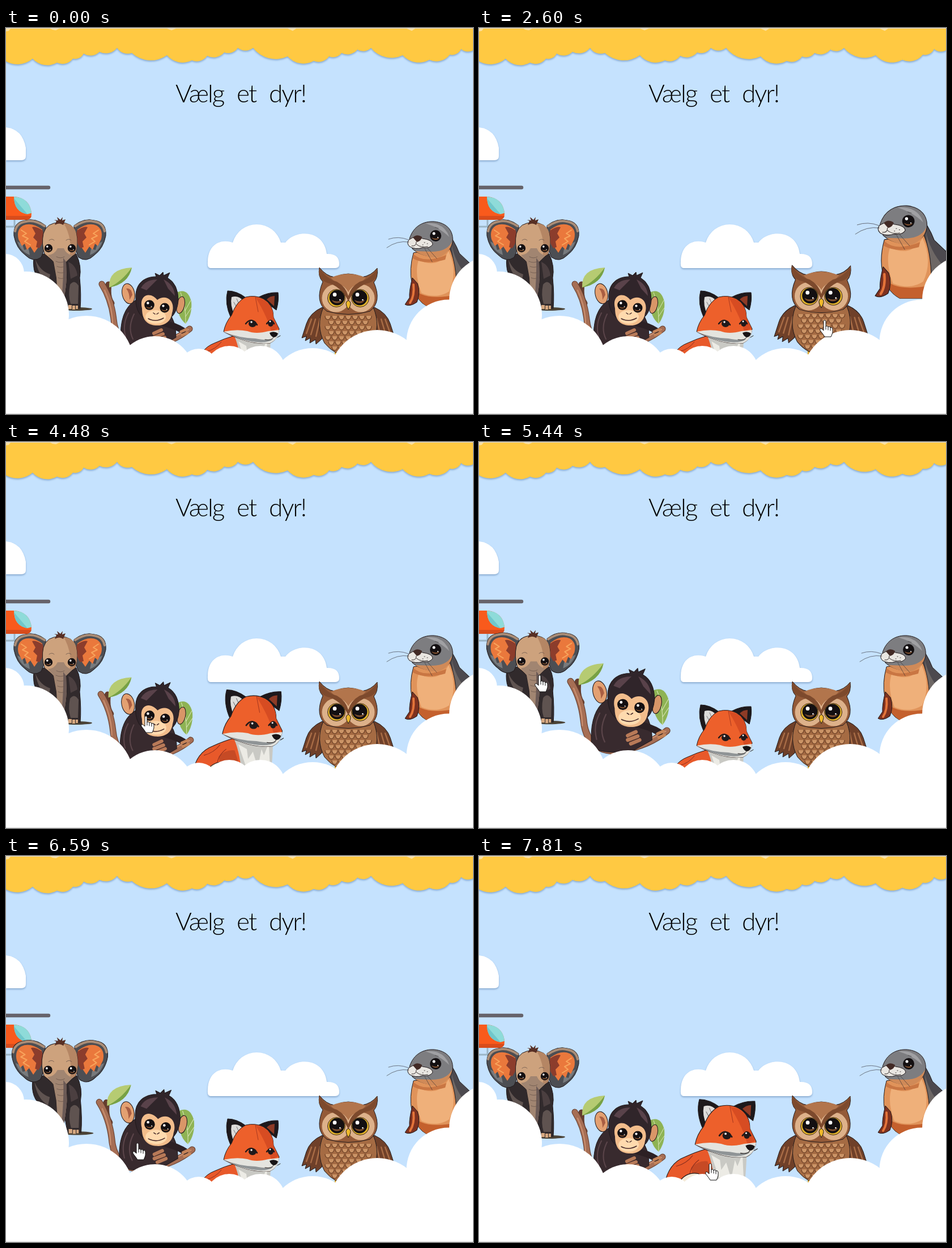
Recreate the animation shown at these times as an HTML page. Size 824x680 px, loop 8 s.

```html
<!DOCTYPE html>
<html lang="da">
<head>
<meta charset="utf-8">
<title>Vælg et dyr!</title>
<style>
html, body { margin: 0; width: 100%; height: 100%; overflow: hidden; background: #c5e2fe; }
svg { display: block; width: 824px; height: 680px; }
.shadow { filter: drop-shadow(0 2px 1.5px rgba(50, 90, 140, .4)); }
.line { fill: none; stroke-linecap: round; stroke-linejoin: round; }
.ink { stroke: #211a1c; stroke-width: 1; stroke-linejoin: round; }
text { font: 300 44px Lato, "Open Sans", sans-serif; letter-spacing: -2px; word-spacing: 13px; text-anchor: middle; }
</style>
</head>
<body>
<svg viewBox="0 0 824 680">
<defs>
  <g id="eye">
    <circle r="10" fill="#130f11"/>
    <path d="M-7 3A8 8 0 0 0 7 3Q0 7 -7 3Z" fill="#80502f"/>
    <circle cx="-3" cy="-4" r="2.5" fill="#fff"/><circle cx="4" cy="3" r="1" fill="#fff"/>
  </g>
</defs>
<rect width="824" height="680" fill="#c5e2fe"/>

<path id="awning" class="shadow" fill="#ffc942"/>
<path d="M0 1H8L5 5 0 6ZM78 1H94L88 4 82 3ZM284 1H300L292 4ZM497 1H512L506 5ZM707 1H722L716 5Z" fill="#fbe0a0"/>
<path d="M0 .5H824" stroke="#dcdcdc"/>
<text x="414" y="131">Vælg et dyr!</text>

<g fill="#fff" class="shadow">
  <path d="M0 175Q29 178 35 211V226Q35 233 27 233H0Z"/>
  <path d="M361 423Q355 423 356 412C356 384 376 370 400 378A44.2 44.2 0 0 1 485 378L493 378C511 354 561 355 566 398Q588 397 588 416 588 423 581 423Z"/>
</g>
<g id="helicopter">
  <path class="line" d="M0 281H75" stroke="#66636b" stroke-width="6.5"/>
  <path class="line" d="M15 337V350M0 350H26" stroke="#9bb5c6" stroke-width="3"/>
  <path d="M0 297H15Q42 300 45 326 45 338 36 338H0Z" fill="#f95a1c"/>
  <path d="M0 331H45Q43 338 36 338H0Z" fill="#d84c1c"/>
  <path d="M14 297Q42 299 45 326L38 328Q14 324 14 297Z" fill="#8edbd9"/>
  <path d="M14 300L38 328Q14 324 14 297Z" fill="#70c7cb"/>
</g>

<g id="elephant">
  <ellipse cx="124" cy="495" rx="28" ry="3" fill="#4b4336"/>
  <path class="ink" d="M50 398Q44 430 60 445L66 510H98L101 455 108 494H131Q133 470 130 440 134 420 124 398Z" fill="#312a2c"/>
  <path d="M52 408Q60 428 78 434L75 448Q56 436 52 408ZM113 452Q121 442 128 454L127 486H114Q109 470 113 452Z" fill="#5f5350"/>
  <path d="M110 412Q124 418 126 436L114 442Z" fill="#4b3f40"/>
  <path d="M110 488h6v7h-6zM117 489h5v7h-5zM123 489h4v6h-4z" fill="#d6a880"/>
  <g id="ear">
    <path class="ink" d="M70 348Q52 334 34 339 12 342 14 366 18 388 34 400 48 414 62 404 71 388 70 348Z" fill="#4c4e53"/>
    <path d="M20 376Q26 394 42 400L40 389 32 391 29 381Z" fill="#777a7d"/>
    <path d="M64 355Q45 341 30 348 18 355 22 372L28 384 33 380 37 391 43 385 50 396 57 386Q66 372 64 355Z" fill="#ea783c"/>
    <path d="M65 357Q52 348 46 351L52 362 48 369 55 376 53 386 59 388Q69 374 65 357Z" fill="#8c3d2c"/>
    <path d="M27 356l9 6-7 4 10 5-6 5 10 6" class="line" stroke="#f8a45c" stroke-width="2"/>
    <path class="line" d="M68 349Q50 337 35 341 19 343 16 358" stroke="#ab8d76" stroke-width="4"/>
  </g>
  <use href="#ear" transform="matrix(-1 0 0 1 190 0)"/>
  <path class="ink" d="M66 362Q72 342 95 343 118 342 124 362 128 380 122 398 114 404 106 412L107 440Q104 480 97 490 90 470 89 440L84 412Q76 404 68 398 62 380 66 362Z" fill="#cda27d"/>
  <path d="M102 344Q120 345 124 362 128 380 122 398L112 404Q118 372 102 344Z" fill="#b58664"/>
  <path d="M74 400Q86 399 91 388H102Q106 398 117 401L106 412 107 440Q104 480 97 490 90 470 89 440L84 412Z" fill="#a18571"/>
  <path d="M101 405L106 412 107 440Q104 480 97 490Q102 440 101 405Z" fill="#6b5a56"/>
  <path class="line" d="M89 403q7 4 14 0M88 411q8 4 16 0M90 420q7 3 14 0M91 430q7 3 13 0M92 440q6 3 12 0M76 374q5-4 9 0M106 374q5-4 9 0" stroke="#6b574d" stroke-width=".8"/>
  <use href="#eye" transform="translate(75 388) scale(.72)"/>
  <use href="#eye" transform="translate(116 388) scale(.72)"/>
  <path d="M86 347L89 340 85 338 92 339 90 333 96 338 100 333 99 339 105 337 101 347Q94 342 86 347Z" fill="#572f24"/>
</g>

<g id="monkey">
  <path class="line" d="M169 451Q186 478 190 513 194 560 238 563 290 558 324 530M186 485Q178 474 181 452" stroke="#643d2e" stroke-width="11"/>
  <path class="line" d="M169 451Q186 478 190 513 194 560 238 563 290 558 324 530" stroke="#a66e54" stroke-width="9"/>
  <path class="line" d="M174 462Q188 492 188 522M292 546L322 531" stroke="#c98f70" stroke-width="2"/>
  <path d="M182 457Q180 424 222 422 216 451 182 457Z" fill="#b6cb72"/>
  <path d="M182 457Q204 447 222 422 216 451 182 457Z" fill="#77a145"/>
  <path d="M303 465Q321 458 327 482 329 505 317 521 297 505 303 465Z" fill="#8eb354"/>
  <path class="line" d="M308 466Q318 490 317 521M326 480L316 498M327 493L317 508" stroke="#d8e5b4"/>
  <path class="ink" d="M231 478Q198 496 203 555 220 570 270 562L300 545Q300 515 286 500Z" fill="#382a2e"/>
  <path class="line" d="M216 502Q205 522 211 544M226 504Q214 528 224 548" stroke="#5b454a" stroke-width="2"/>
  <path class="line" d="M274 519Q298 524 312 533" stroke="#2c2024" stroke-width="11"/>
  <path class="line" d="M309 535l9-4M311 541l9-4" stroke="#c48358" stroke-width="5"/>
  <path class="line" d="M261 538l13-6M261 545l16-6M266 551l14-6" stroke="#b87a58" stroke-width="6"/>
  <path class="line" d="M262 541l14-6M264 548l15-6" stroke="#51312a"/>
  <ellipse class="ink" cx="216" cy="468" rx="11" ry="18" fill="#e3a071" transform="rotate(-12 216 468)"/>
  <path d="M212 459Q221 457 223 470L218 479Q218 466 212 459Z" fill="#a95e43"/>
  <ellipse class="ink" cx="308" cy="488" rx="7" ry="15" fill="#d99668" transform="rotate(12 308 488)"/>
  <path class="ink" d="M229 475C228 449 245 438 265 438L263 432 271 436 277 430 278 436 289 431 285 440Q304 451 304 480C302 503 290 519 266 519 242 517 228 502 229 475Z" fill="#30252a"/>
  <path d="M238 458Q246 443 267 443L248 462ZM278 443Q297 452 298 472L286 459Z" fill="#59424a"/>
  <path d="M240 494C234 470 254 463 267 479 282 468 300 480 293 502 291 519 278 525 264 524 247 523 240 512 240 494Z" fill="#f2bd8c"/>
  <ellipse cx="264" cy="509" rx="18" ry="12" fill="#ffdaae"/>
  <path class="line" d="M251 512Q264 519 278 511M260 502l3 2M269 502l-3 2" stroke="#46292a" stroke-width="1.5"/>
  <use href="#eye" transform="translate(253 488) scale(.88)"/>
  <use href="#eye" transform="translate(280 493) scale(.85)"/>
</g>

<g id="fox">
  <path class="ink" d="M335 600Q341 565 368 555 385 547 403 542L430 570V610H335Z" fill="#e8592a"/>
  <path d="M378 572Q390 560 404 562L420 610H384Z" fill="#c64a25"/>
  <path class="line" d="M354 570Q370 566 380 553M376 594Q372 574 390 560" stroke="#8d301f"/>
  <path class="ink" d="M358 596Q370 578 390 582L392 606H354Z" fill="#f4ead7"/>
  <path d="M403 543L467 550Q466 574 463 610H416Q414 568 403 543Z" fill="#c9c9c4"/>
  <path d="M410 552L424 560 426 576 434 564 442 590 448 560 452 570 460 550 463 610H430Z" fill="#ecebe5"/>
  <path class="ink" d="M391 463Q407 463 423 475L397 511Q385 485 391 463ZM480 466Q463 465 446 474L477 497Q482 480 480 466Z" fill="#1d191c"/>
  <path d="M398 474Q410 470 419 481L403 505Q395 488 398 474Z" fill="#dddcda"/>
  <path d="M402 483l6 11M407 477l4 9" class="line" stroke="#77757a"/>
  <path d="M474 472Q466 472 460 478L473 490Z" fill="#8e3b26"/>
  <path class="ink" d="M384 535Q387 519 398 506 406 482 423 474 440 470 454 477 472 487 472 510L482 530Q480 549 466 555 440 558 411 547Q396 542 384 535Z" fill="#ed602b"/>
  <path d="M451 477Q472 487 472 510L481 529 468 535Q462 510 440 474Z" fill="#d74c22"/>
  <path class="line" d="M440 474L445 500" stroke="#a93a20"/>
  <path d="M384 535Q407 530 426 534 441 540 463 534L482 532Q480 549 466 555 440 558 411 547Z" fill="#e4e4df"/>
  <path d="M384 535Q410 546 440 547 460 551 472 548 456 560 411 547Z" fill="#8f9496"/>
  <path class="line" d="M423 521Q433 508 443 523M460 521Q468 511 473 521" stroke="#261a19" stroke-width="2.5"/>
  <ellipse cx="435" cy="521" rx="7" ry="6" fill="#20191b"/><ellipse cx="467" cy="520" rx="5" ry="6" fill="#20191b"/>
  <circle cx="433" cy="518" r="1.7" fill="#fff"/><circle cx="466" cy="517" r="1.4" fill="#fff"/>
  <path d="M465 537Q473 533 480 538 478 545 472 545 467 543 465 537Z" fill="#171416"/>
  <path class="line" d="M472 545Q469 551 457 549M479 545l5-3" stroke="#28211f"/>
</g>

<g id="owl">
  <path class="line" d="M576 582h12M622 582h12M582 570v10M629 570v10" stroke="#e0a92a" stroke-width="4"/>
  <g id="wing">
    <path class="ink" d="M558 492Q536 502 530 521L522 546 530 543 528 551 537 546 536 555 546 549 547 557 557 548 570 512Z" fill="#6f4029"/>
    <path class="line" d="M539 513L530 538M546 513L538 540M554 512L547 543" stroke="#a86c46" stroke-width="2.5"/>
  </g>
  <use href="#wing" transform="matrix(-1 0 0 1 1208 0)"/>
  <path class="ink" d="M560 492Q546 525 562 555 580 577 604 577 628 577 646 555 662 525 648 492Z" fill="#a56b43"/>
  <path id="scales" fill="#cb9466" stroke="#74462a" stroke-width="1.3"/>
  <path class="ink" d="M553 422Q565 437 580 439 604 427 628 439 645 436 655 423 657 440 649 448 664 482 642 499 604 510 566 499 544 482 559 447 550 438 553 422Z" fill="#935a38"/>
  <path d="M573 440Q604 426 635 440L604 471Z" fill="#b2754c"/>
  <circle cx="582" cy="476" r="24.5" fill="#ddb18a"/><circle cx="626" cy="476" r="24.5" fill="#ddb18a"/>
  <path d="M553 422Q565 442 584 447 600 456 604 472 608 456 624 447 644 442 655 423 657 443 641 449 618 454 604 481 590 454 567 449 548 442 553 422Z" fill="#7d4a2d"/>
  <g fill="#e1b32b" stroke="#3d271c"><circle cx="583" cy="476" r="15.5"/><circle cx="625" cy="476" r="15.5"/></g>
  <use href="#eye" transform="translate(584 475) scale(1.34)"/>
  <use href="#eye" transform="translate(624 475) scale(1.34)"/>
  <path class="ink" d="M604 480Q612 483 604 496 596 483 604 480Z" fill="#efb92b"/>
</g>

<g id="seal">
  <path class="ink" d="M774 354Q791 373 800 397L818 414 834 430V520H790Z" fill="#4c494e"/>
  <path d="M786 380Q792 414 816 440V480H798Z" fill="#6d6765"/>
  <path class="ink" d="M719 396Q711 425 716 449 722 480 744 491H794Q799 423 782 386Z" fill="#e0935a"/>
  <path d="M728 409Q764 425 781 393 798 430 782 464 760 478 733 467 720 433 728 409Z" fill="#efb07a"/>
  <path d="M718 456Q732 482 795 470V491H744Q724 479 718 456Z" fill="#c4602d"/>
  <path d="M719 398Q736 416 777 400L775 408Q740 418 718 406Z" fill="#c97643"/>
  <path class="ink" d="M717 440Q711 464 712 475L704 487Q712 492 725 483 732 466 726 450Z" fill="#7e3220"/>
  <path class="line" d="M719 452Q721 472 713 484" stroke="#e4743a" stroke-width="4"/>
  <path class="ink" d="M712 371C719 348 738 340 755 341 779 343 790 358 788 377 785 396 764 404 746 402Q728 399 717 389Z" fill="#7d7d80"/>
  <path d="M740 344Q773 341 782 368 766 352 740 344Z" fill="#a0a0a3"/>
  <path d="M751 394Q779 394 787 376 785 395 764 404 741 406 722 393Z" fill="#d08a58"/>
  <path class="ink" d="M711 373Q724 364 735 371 752 373 753 381 748 389 735 387 722 391 712 385 706 379 711 373Z" fill="#e9e6e1"/>
  <path d="M718 369Q725 362 734 368 733 375 725 377Z" fill="#422a25"/>
  <path class="line" d="M724 377Q724 385 716 384M724 381Q733 388 744 385M738 378h1M743 380h1M735 382h1" stroke="#332b2a"/>
  <use href="#eye" transform="translate(758 366)"/>
  <path class="line" d="M757 351l6 2M711 377Q690 374 672 387M710 373Q692 366 675 372M744 388L760 406M739 389L752 412" stroke="#302c2e" stroke-width=".6"/>
</g>

<g id="foreground" fill="#fff">
  <path d="M0 432H30L110 505V550L217 560 330 585H707V550L782 500V479H824V680H0Z"/>
</g>
<path d="M0 679.5H824" stroke="#dcdcdc"/>

<g id="cursor" fill="#fff" stroke="#111" stroke-linejoin="round">
  <path id="arrow" d="M0 0V23L5.5 18 9.5 26 13 24.5 9.5 17H16Z"/>
  <g id="hand">
    <path d="M-2 2Q0-1 2 2V12Q4 9 6 13 8 10 10 14 13 12 14 16V22Q13 26 11 30H0Q-3 25-8 19-9 14-5 16L-2 19Z"/>
    <path class="line" d="M2 12V17M6 13V18M10 14V19"/>
  </g>
</g>
</svg>
<script>
const LOOP = 8000, HOVER_MS = 300;
const $ = id => document.getElementById(id);

// Scalloped edge: arcs hung between these points
const edge = [[-4,56],[47,54],[90,61],[118,54],[137,45],[165,42],[196,35],[222,44],[284,48],
  [328,57],[355,49],[385,43],[409,35],[436,35],[497,50],[543,58],[570,50],[592,44],[620,38],
  [644,35],[700,48],[747,56],[783,47],[803,37],[826,38]];
$('awning').setAttribute('d', 'M-4 0V56' + edge.slice(1).map(([x, y], i) => {
  const r = .8 * Math.hypot(x - edge[i][0], y - edge[i][1]);
  return `A${r} ${r} 0 0 0 ${x} ${y}`;
}).join('') + 'V0Z');

// Cloud puffs: centre x, centre y, radius
$('foreground').innerHTML += [[-2,432,34],[35,505,76],[142,590,83],[263,613,70],[340,600,35],
  [394,602,42],[449,604,44],[541,641,77],[655,617,85],[781,553,74.5],[860,479,78]]
  .map(([x, y, r]) => `<circle cx="${x}" cy="${y}" r="${r}"/>`).join('');

// Chest feathers, lowest row first so that upper rows overlap
let scales = '';
for (let row = 6; row >= 0; row--) {
  const y = 507 + row * 9, half = 44 * Math.sqrt(1 - ((y - 525) / 58) ** 2);
  for (let x = 556 + row % 2 * 6; x < 650; x += 12)
    if (Math.abs(x - 604) < half - 3) scales += `M${x - 5} ${y}Q${x - 5} ${y + 6} ${x} ${y + 7}Q${x + 5} ${y + 6} ${x + 5} ${y}`;
}
$('scales').setAttribute('d', scales);

// Zoom centre and the [enter, leave] times of each hover
const animals = {
  seal: { at: [762, 461], hovers: [[1630, 2565]] },
  owl: { at: [604, 543], hovers: [[2565, 3450]] },
  fox: { at: [412, 605], hovers: [[3570, 4430], [7510, LOOP]] },
  monkey: { at: [246, 550], hovers: [[4430, 5430], [6490, 7510]] },
  elephant: { at: [95, 453], hovers: [[5420, 6490]] }
};
const pointer = [[1580,822,545],[1930,765,420],[2390,765,420],[2600,610,514],[2880,604,520],
  [3180,604,520],[3460,487,545],[3700,430,535],[4340,430,535],[4480,247,482],[4620,240,478],
  [5300,240,478],[5440,107,410],[5580,104,404],[6310,104,404],[6590,232,505],[6800,236,510],
  [7390,236,510],[7600,400,535],[7810,408,541],[LOOP,408,541]];

// cubic-bezier(.25, .1, .25, 1)
function ease(x) {
  if (x <= 0) return 0;
  if (x >= 1) return 1;
  let lo = 0, hi = 1, u;
  for (let i = 0; i < 20; i++) {
    u = (lo + hi) / 2;
    if (.75 * u * (1 - u) + u ** 3 < x) lo = u; else hi = u;
  }
  return .3 * u * (1 - u) ** 2 + 3 * u * u * (1 - u) + u ** 3;
}

function pointerAt(t) {
  if (t >= 190 && t < 260) return [819, 674];
  if (t < pointer[0][0]) return null;
  const i = pointer.findIndex(key => key[0] > t), [t0, x0, y0] = pointer[i - 1], [t1, x1, y1] = pointer[i];
  const k = (t - t0) / (t1 - t0);
  return [x0 + (x1 - x0) * k, y0 + (y1 - y0) * k];
}

function draw(now) {
  const t = now % LOOP;
  let hovering = false;
  for (const [id, { at: [x, y], hovers }] of Object.entries(animals)) {
    let lift = 0;
    for (const [enter, leave] of hovers) {
      lift += ease((t - enter) / HOVER_MS) - ease((t - leave) / HOVER_MS);
      hovering ||= t >= enter && t < leave;
    }
    $(id).setAttribute('transform', `translate(${x} ${y - 20 * lift}) scale(${1 + .1 * lift}) translate(${-x} ${-y})`);
  }
  const spot = pointerAt(t);
  $('cursor').style.display = spot ? '' : 'none';
  if (spot) $('cursor').setAttribute('transform', `translate(${spot})`);
  $('hand').style.display = hovering ? '' : 'none';
  $('arrow').style.display = hovering ? 'none' : '';
  requestAnimationFrame(tick);
}
const start = performance.now();
const tick = () => draw(performance.now() - start);
tick();
</script>
</body>
</html>
```
